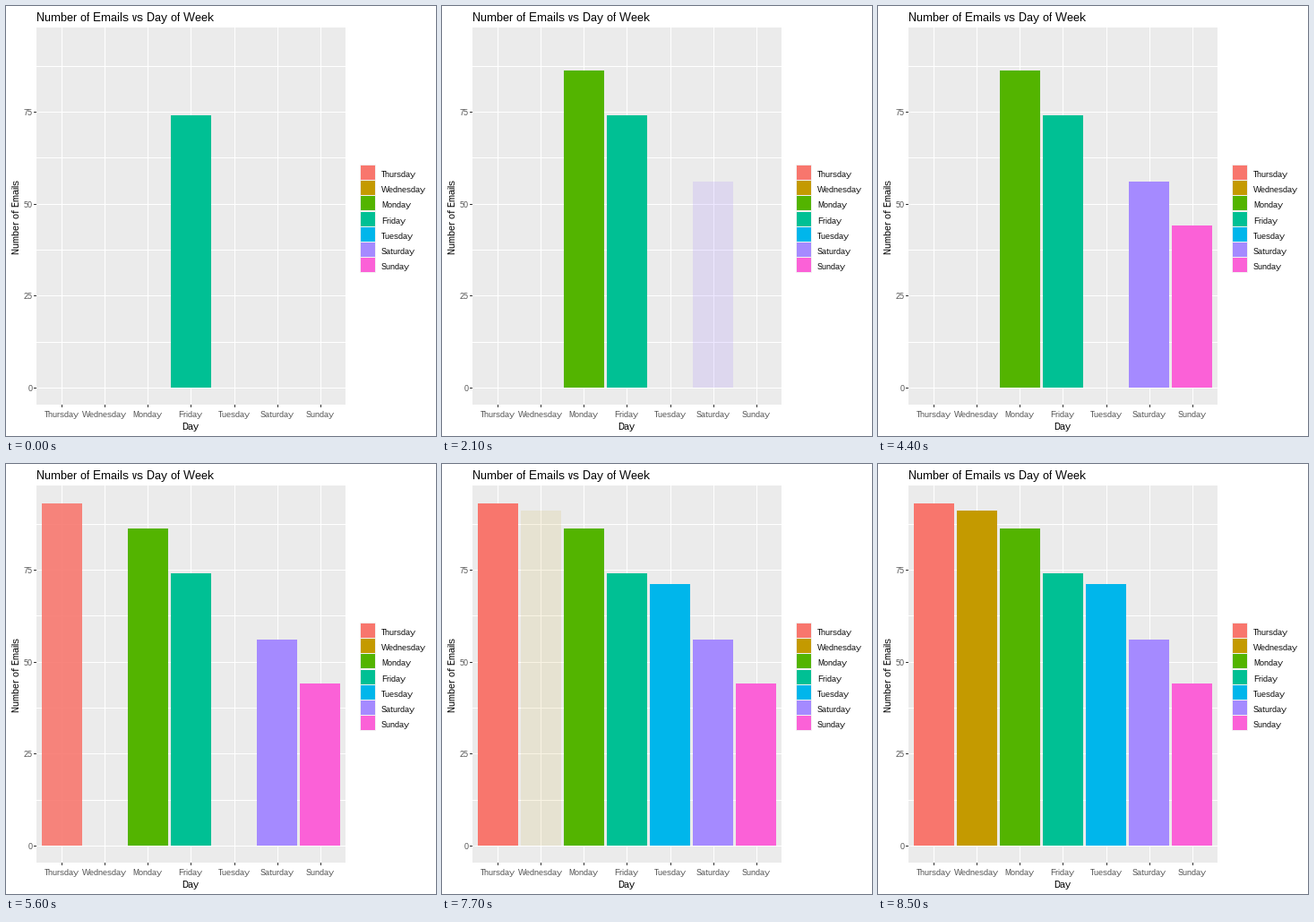
Animation, 480 px wide and 480 px high, one loop 10 s. Source, as a matplotlib script:

```python
import matplotlib.pyplot as plt
from matplotlib.animation import FuncAnimation
from matplotlib.patches import Rectangle

plt.rcParams.update({
    "font.family": "Liberation Sans",
    "text.hinting": "native",
    "text.hinting_factor": 1,
    "text.kerning_factor": 6,
})

SIZE, DPI = 480, 72
FRAMES, INTERVAL = 100, 100
LEFT, TOP, RIGHT, BOTTOM = 34, 24, 379, 445
ZERO, UNIT = 426, 4.107
INK, GREY = "#333333", "#4D4D4D"

# day, emails, colour, first fade frame, fade length in frames
DAYS = [
    ("Thursday", 93, "#F8766D", 49, 9),
    ("Wednesday", 91, "#C49A00", 77, 9),
    ("Monday", 86, "#53B400", 5, 10),
    ("Friday", 74, "#00C094", 0, 1),
    ("Tuesday", 71, "#00B6EB", 63, 9),
    ("Saturday", 56, "#A58AFF", 20, 10),
    ("Sunday", 44, "#FB61D7", 35, 10),
]

fig = plt.figure(figsize=(SIZE / DPI, SIZE / DPI), dpi=DPI, facecolor="white")
ax = fig.add_axes([0, 0, 1, 1])
ax.set(xlim=(0, SIZE), ylim=(SIZE, 0))
ax.axis("off")


def box(x0, y0, x1, y1, color, z=1):
    patch = Rectangle((x0, y0), x1 - x0, y1 - y0, facecolor=color,
                      linewidth=0, antialiased=False, zorder=z)
    return ax.add_patch(patch)


def label(x, y, text, size, color="black", ha="left", **kw):
    ax.text(x, y, text, fontsize=size, color=color, ha=ha, va="baseline", **kw)


def row(value):
    return round(ZERO - UNIT * value)


def column(i):
    return round(62 + 48.13 * i)


# panel, grid and axes
box(LEFT, TOP, RIGHT, BOTTOM, "#EBEBEB")
for value in (0, 12.5, 25, 37.5, 50, 62.5, 75, 87.5):
    y = row(value)
    box(LEFT, y, RIGHT, y + 1, "white", 2)
    if value % 25 == 0:
        box(LEFT - 3, y, LEFT, y + 1, INK)
        label(30, y + 4, f"{value:.0f}", 9, GREY, "right")
for i, (day, *_) in enumerate(DAYS):
    x = column(i)
    box(x, TOP, x + 1, BOTTOM, "white", 2)
    box(x, BOTTOM, x + 1, BOTTOM + 3, INK)
    label(x, 459, day, 9, GREY, "center")

label(34, 17, "Number of Emails vs Day of Week", 13)
label(205.5, 473, "Day", 11, ha="center")
label(15, 235.5, "Number of Emails", 11, ha="right", rotation=90,
      rotation_mode="default") if False else ax.text(
    15, 235.5, "Number of Emails", fontsize=11, rotation=90,
    rotation_mode="anchor", ha="center", va="baseline")

# legend
box(395, 177, 413, 298, "#F2F2F2")
for i, (day, _, color, *_) in enumerate(DAYS):
    y = round(178 + 17.22 * i)
    box(396, y, 412, y + 16, color, 2)
    label(419, y + 13, day, 9)

bars = [box(40 + 48 * i, int(ZERO - UNIT * emails), 85 + 48 * i, ZERO, color, 3)
        for i, (_, emails, color, *_) in enumerate(DAYS)]


def update(frame):
    for bar, (*_, start, steps) in zip(bars, DAYS):
        bar.set_alpha(min(max((frame - start + 1) / steps, 0), 1))
    return bars


animation = FuncAnimation(fig, update, frames=FRAMES, interval=INTERVAL,
                          repeat=True, repeat_delay=0, blit=False)
plt.show()
```
